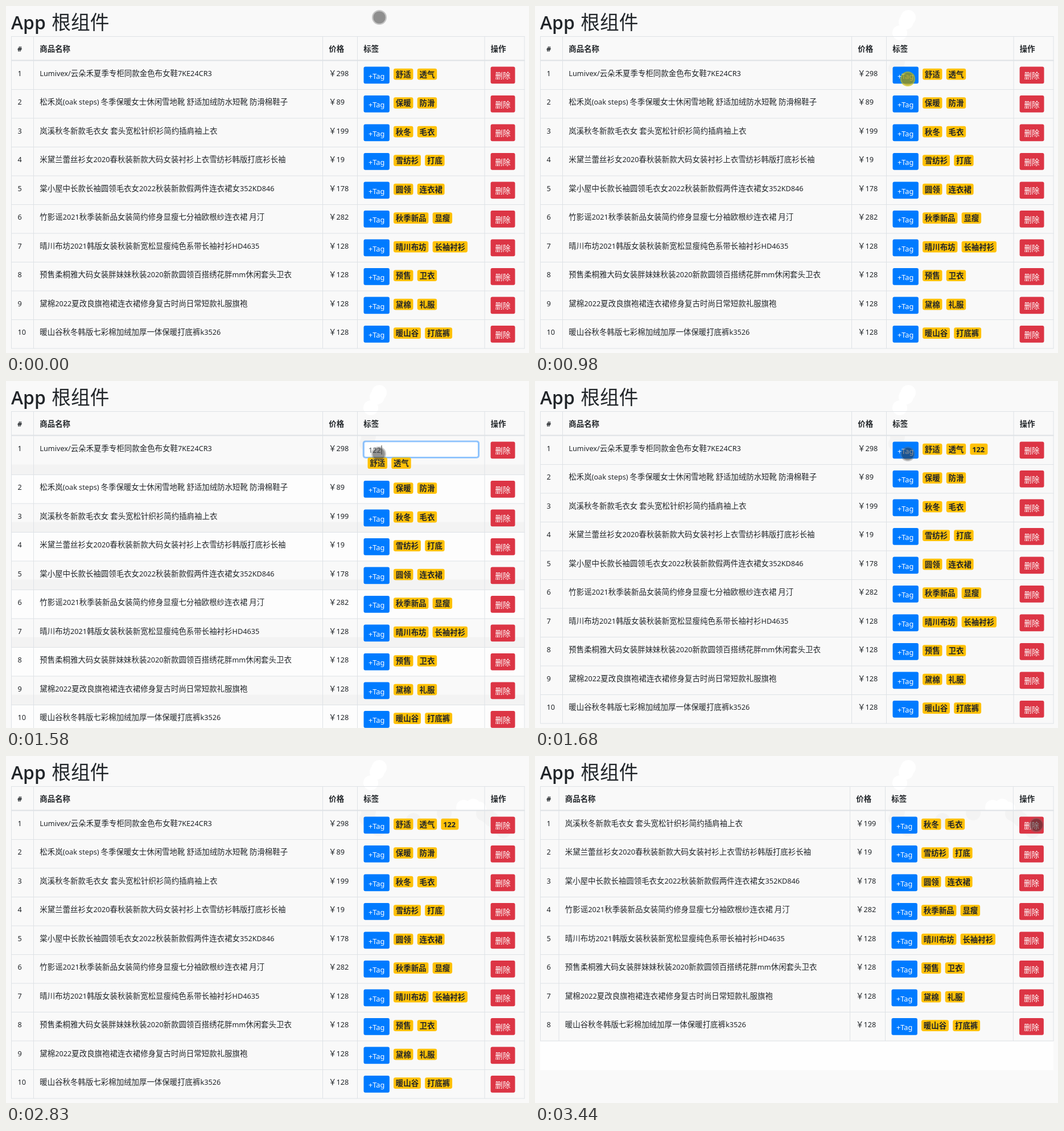
Write an HTML page that moves like this. It is 919 px wide and 609 px high and loops after 3.56 s.

```html
<!DOCTYPE html>
<html lang="zh-CN">
<head>
<meta charset="utf-8">
<title>App 根组件</title>
<style>
html, body { margin: 0; width: 100%; height: 100%; overflow: hidden; background: #f9f9f9; }
svg { display: block; width: 919px; height: 609px; }
text {
  font: 400 13.45px "Noto Sans CJK SC", "Noto Sans CJK", "Noto Sans CJK JP", sans-serif;
  fill: #212529;
}
.latin { font-family: "Noto Sans", "Open Sans", sans-serif; font-size: .945em; }
.bold { font-weight: 700; }
.white { fill: #fff; }
.input { fill: #495057; }
.title { font-size: 33.75px; font-weight: 300; }
.title .latin { font-family: "Open Sans", "Noto Sans", sans-serif; font-weight: 600; }
.line { stroke: #dee2e6; fill: none; }
</style>
</head>
<body>
<svg viewBox="0 0 919 609">
  <clipPath id="above"><rect width="919" height="96"/></clipPath>
  <clipPath id="below"><rect y="96" width="919" height="513"/></clipPath>
  <g id="trail"></g>
  <g id="page"></g>
  <g id="pointer"></g>
</svg>
<script>
const LOOP = 3560, TOP = 96, ROW = 50.5, GROW = 18, PAD = 10.8;

const goods = [
  ["Lumivex/云朵禾夏季专柜同款金色布女鞋7KE24CR3", 298, "舒适 透气"],
  ["松禾岚(oak steps) 冬季保暖女士休闲雪地靴 舒适加绒防水短靴 防滑棉鞋子", 89, "保暖 防滑"],
  ["岚溪秋冬新款毛衣女 套头宽松针织衫简约插肩袖上衣", 199, "秋冬 毛衣"],
  ["米黛兰蕾丝衫女2020春秋装新款大码女装衬衫上衣雪纺衫韩版打底衫长袖", 19, "雪纺衫 打底"],
  ["棠小屋中长款长袖圆领毛衣女2022秋装新款假两件连衣裙女352KD846", 178, "圆领 连衣裙"],
  ["竹影谣2021秋季装新品女装简约修身显瘦七分袖欧根纱连衣裙 月汀", 282, "秋季新品 显瘦"],
  ["晴川布坊2021韩版女装秋装新宽松显瘦纯色系带长袖衬衫HD4635", 128, "晴川布坊 长袖衬衫"],
  ["预售柔桐雅大码女装胖妹妹秋装2020新款圆领百搭绣花胖mm休闲套头卫衣", 128, "预售 卫衣"],
  ["黛棉2022夏改良旗袍裙连衣裙修身复古时尚日常短款礼服旗袍", 128, "黛棉 礼服"],
  ["暖山谷秋冬韩版七彩棉加绒加厚一体保暖打底裤k3526", 128, "暖山谷 打底裤"]
].map(([name, price, tags]) => ({ name, price, tags: tags.split(" ") }));

// time, x, y of each pointer stop
const stops = [
  [0, 656, 20], [40, 655, 22], [140, 652, 28], [240, 641, 47], [340, 637, 97],
  [440, 634, 110], [540, 642, 116], [640, 649, 122], [740, 653, 126], [840, 655, 128],
  [1730, 716, 113], [1830, 770, 100], [1930, 804, 90], [2030, 821, 88],
  [2130, 831, 93], [2230, 839, 101], [2330, 846, 105], [2430, 853, 111],
  [2530, 861, 118], [2630, 868, 125], [2730, 874, 131], [2930, 879, 123], [3030, 881, 121]
];
const clicks = [[980, 1000], [3330, 3350], [3400, 3440]];
const typed = [[1300, "1"], [1400, "12"], [1480, "122"]];

const within = (t, [from, to]) => t >= from && t < to;
const rect = (x, y, w, h, fill, r = 0, more = "") =>
  `<rect x="${x}" y="${y}" width="${w}" height="${h}" rx="${r}" fill="${fill}" ${more}/>`;
const text = (x, y, s, cls = "") =>
  `<text x="${x}" y="${y}" class="${cls}">` +
  String(s).replace(/[\x21-\x7e]+/g, m => `<tspan class="latin">${m}</tspan>`) + "</text>";
const line = (x1, y1, x2, y2, w = 1) =>
  `<path class="line" stroke-width="${w}" d="M${x1} ${y1}L${x2} ${y2}"/>`;

function badges(x, y, tags) {
  return tags.map(tag => {
    const size = /\d/.test(tag) ? 23.4 : tag.length * 13.45;
    const out = rect(x, y, size + 7.6, 19.8, "#ffc107", 3.4) + text(x + 3.8, y + 14.9, tag, "bold");
    x += size + 14.8;
    return out;
  }).join("");
}

function inputBox(x, y, value, ring) {
  const end = x + 8.7 + value.length * 7.3;
  return rect(x - 1.6, y + 8.4, 205.4, 31.4, "#007bff", 5, `opacity="${.42 * ring}"`) +
    rect(x + .9, y + 10.8, 200.5, 26.7, "#fff", 3, 'stroke="#80bdff"') +
    text(x + 8.7, y + 30, value, "input") +
    rect(end + .6, y + 17, 1, 16, "#333");
}

function row(item, i, y, cols, edit) {
  const [, name, price, tag, action] = cols.map(c => c + PAD);
  const tools = edit
    ? inputBox(tag, y, edit.value, edit.ring) + badges(tag + 7.2, y + 38.3, item.tags)
    : rect(tag + .2, y + 10.6, 45.4, 29.7, "#007bff", 3) +
      text(tag + 8.7, y + 31.5, "+Tag", "white") +
      badges(tag + 52.7, y + 13.7, item.tags);
  return text(20.5, y + 26.5, i + 1) + text(name, y + 26.5, item.name) +
    text(price - .3, y + 26.5, "￥" + item.price) + tools +
    rect(action - .2, y + 10.6, 42.9, 29.7, "#dc3545", 3) +
    text(action + 7.8, y + 31.3, "删除", "white");
}

function page(s) {
  const cols = s.removed ? [9.5, 42, 553.5, 615.5, 840.4] : [9.5, 48.5, 556.5, 617.5, 841];
  const items = goods.slice(s.removed);
  let out = text(9, 41, "App", "title") + text(80.2, 41, "根组件", "title");
  ["#", "商品名称", "价格", "标签", "操作"].forEach((head, i) =>
    out += text(i ? cols[i] + PAD : 20, 79.8, head, "bold"));

  let lines = line(9, 53.5, 911.5, 53.5) + line(9, 95.5, 911.5, 95.5, 2);
  let y = TOP;
  items.forEach((item, i) => {
    const edit = s.edit && i === 0 ? s : null;
    const h = ROW + (edit ? GROW : 0);
    if (s.edit) {
      out += i % 2
        ? rect(9, y, 902, h, "#fdfdfd")
        : rect(9, y + h - GROW, 902, GROW, "#f3f3f3");
    }
    out += row(item, i, y, cols, edit);
    y += h;
    lines += line(9, y, 911.5, y);
  });
  if (s.removed === 2) out += rect(9, y + .8, 902, ROW, "#fefefe");
  [...cols, 911].forEach(x => lines += line(x, 53, x, y));
  return out + lines;
}

function pageState(t) {
  const edit = t >= 1000 && t < 1680;
  const value = typed.reduce((v, [at, s]) => t >= at ? s : v, "");
  return {
    edit,
    value: edit ? value : "",
    ring: t < 1100 ? .6 : 1,
    tagged: t >= 1680,
    removed: t >= 3440 ? 2 : t >= 3350 ? 1 : 0
  };
}

function trail(past) {
  return past.map(([, x, y]) => {
    const upper = y < 94;
    return `<g clip-path="url(#${upper ? "above" : "below"})">` +
      `<circle cx="${x}" cy="${y}" r="13" fill="${upper ? "#fff" : "#f3f3f3"}"/></g>`;
  }).join("");
}

function pointer([, x, y], pressed) {
  const [fill, ring] = pressed
    ? ["rgba(165,150,0,.75)", "rgba(205,190,0,.7)"]
    : ["rgba(50,50,50,.53)", "rgba(105,105,105,.36)"];
  return `<circle cx="${x}" cy="${y}" r="10.8" fill="${fill}"/>` +
    `<circle cx="${x}" cy="${y}" r="11.9" fill="none" stroke="${ring}" stroke-width="2.2"/>`;
}

const shown = {};
function put(id, html) {
  if (shown[id] === html) return;
  document.getElementById(id).innerHTML = shown[id] = html;
}

function draw(t) {
  const s = pageState(t);
  goods[0].tags = s.tagged ? ["舒适", "透气", "122"] : ["舒适", "透气"];
  const past = stops.filter(p => p[0] <= t);
  const hidden = within(t, [2830, 2930]);
  const pressed = clicks.some(c => within(t, c));
  put("trail", trail(hidden ? past : past.slice(0, -1)));
  put("page", page(s));
  put("pointer", hidden ? "" : pointer(past[past.length - 1], pressed));
}

const start = performance.now();
function tick() {
  draw((performance.now() - start) % LOOP);
  requestAnimationFrame(tick);
}
tick();
</script>
</body>
</html>
```
